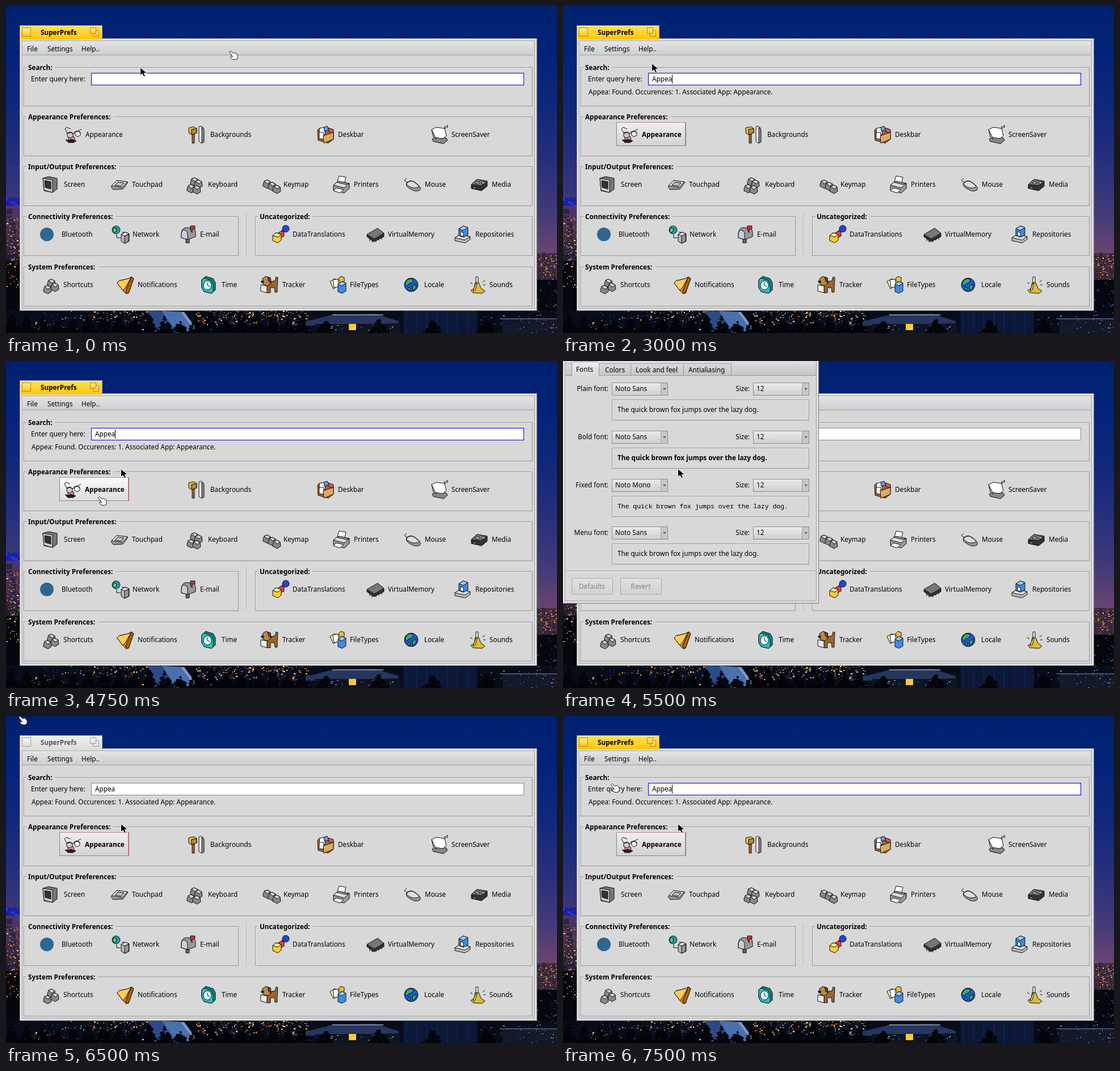
Write an HTML page with a canvas that moves like this. It is 971 px wide and 577 px high and loops after 8 s.

```html
<!DOCTYPE html>
<html lang="en">
<head>
<meta charset="utf-8">
<title>SuperPrefs</title>
<style>
html, body { margin: 0; width: 100%; height: 100%; overflow: hidden; background: #00206f; }
canvas { display: block; }
</style>
</head>
<body>
<canvas id="stage" width="971" height="577"></canvas>
<script>
const g = document.getElementById('stage').getContext('2d');
const PANEL = '#d8d8d8', LINE = '#989898', STEP = 250, LOOP = 8000;
const SANS = '11.72px "Noto Sans", sans-serif', MONO = '11.4px "Noto Sans Mono", monospace';

// A keycap: dark body with a lighter top face.
const key = (x, y) => `#888 M${x} ${y}l2-6 5-2 6 3 1 8-6 4-8-4z|#d4d4d4 M${x + 2} ${y - 6}l5-2 6 3-5 4z`;

// Layers are "fill path", drawn around the icon's centre.
const icons = {
  Appearance: '#e88 M-8 4l5-2 5 2 1 5-6 3-5-3z|#222 M-13 9l6 1 4-2 6 2 3 1-5 3-9 0z|#ccc M-10 -3l6-2 4 3 0 5-5 3-5-3z|#eee M3 -5l6-2 4 3 0 5-5 3-4-3z|none M-10 -3l-4-7 3-3 7 3M10 -7l5-3M0 -2l4-1M-10 -2l6-2 4 3M3 -4l6-2 4 3',
  Backgrounds: '#963 M-9 -1h4v16h-4z|#db5 M-15 -12l9-2 5 3v8l-9 3-5-3z|#b83 M-10 -9l9-2v8l-9 3z|#eee M3 -14l4-1 4 3v25l-4 2-4-3z|#888 M8 -13l4 4v22l-4 2z',
  Deskbar: '#a63 M-14 -8l4-4 24 6v14l-9 7-18-5z|#fff M-11 -11l9-2 2 12-10 3z|#69e M-3 -13l6-2 3 7-8 2z|#d55 M5 -12l9 3v6l-8-2z|#fff M-11 -4h8v12l-8-1z|#da6 M-4 2l18-6v12l-17 7z',
  ScreenSaver: '#888 M-13 8l5-4 20 2 2 4-7 6-18-4z|#bbb M-14 -9l6 3 2 14-5-4z|#fff M-14 -9l8-4 15 2 3 13-6 5-13-2z|none M8 -14h3l-3 3h3M12 -16h3l-3 3h3',
  Screen: '#777 M-13 -11l10-3 15 3v19l-8 6-15-3z|#ccc M-13 -11l17 3v22l-15-4z|#333 M-10 -7l11 2v13l-10-3z',
  Touchpad: '#999 M-15 4l10-11 20 3-9 12-17 1z|#ddd M-14 2l9-9 19 2-9 10z|#bbc M-8 1l5-5 11 1-5 6z',
  Keyboard: [key(-8, -4), key(-1, 0), key(-14, 8), key(-4, 10)].join('|'),
  Keymap: [key(-15, 0), key(-6, 4), key(2, 9)].join('|'),
  Printers: '#fff M-4 -15l12 2-3 13-13-2z|#999 M-14 1l9-7 19 4v9l-9 8-19-5z|#ddd M-14 1l6-5 16 4 6-2-9 8z|#fff M-14 11l5-5 13 3-6 6z',
  Mouse: '#999 M-10 -3q7-7 16 0 12 9 7 13-7 4-16-2-10-5-7-11z|#ddd M-9 -3q7-6 14 0 9 6 6 8-10 3-17-2-6-4-3-6z|none M-9 -4l-5-3 4-4',
  Media: '#333 M-14 0l10-9 18 3v9l-10 8-18-4z|#777 M-14 0l10-9 18 3-10 8z|#ccc M-7 -2l3-3 5 1-3 3zM3 -2l3-3 5 1-3 3z|#999 M-11 4l5 1v3l-5-1z',
  Network: '#29a M-15 -8a7 7 0 1 1 14 0 7 7 0 1 1-14 0z|#6c7 M-12 -12l5 2-1 5-4 2-2-4z|none M-7 0v6h7M2 -4l9 1|#bbb M1 0l7-4 7 3v13l-8 4-6-4z|#ddd M1 0l7-4 7 3-8 4z|#999 M7 3l7-3v12l-7 4z',
  'E-mail': '#666 M-4 7h6v8h-6z|#999 M-12 -2q1-9 8-10l13 1q4 2 4 8v7l-13 5-12-3z|#ccd M-12 -2q2-8 7-5 5 3 4 9v7l-11-3z|#c33 M4 -8v-7h8v5l-5 1v6z',
  DataTranslations: '#c33 M-2 -3l6-6 4 3-6 6z|#24d M3 -10a6 6 0 1 1 12 0 6 6 0 1 1-12 0z|#e44 M-4 -3l6-3 4 3v6l-6 3-4-3z|#fc3 M-14 2l6-5 9 3v10l-6 5-9-4z|#fe9 M-14 2l6-5 9 3-6 5z',
  VirtualMemory: '#333 M-15 1l19-10 11 7v6l-18 9-12-9z|#777 M-15 0l19-11 11 9-17 10z|none M-10 6v6M-6 9v5M1 9v5M6 6v5M11 4v5',
  Repositories: '#bbb M-14 6l9-6 18 4v5l-9 6-18-4z|#ddd M-14 6l9-6 18 4-9 6z|#48d M-7 -10l8-5 8 3v13l-8 4-8-3z|#9cf M-7 -10l8-5 8 3-8 5z|#fff M-4 -5l5 2v7l-5-2z',
  Shortcuts: [key(-7, -2), key(-1, 5), key(-14, 9)].join('|'),
  Notifications: '#d82 M-15 -3q2-5 7-5l13-3 5-3 4 3-5 14-4 11-4 2-6-6z|#fc5 M-15 -3q2-5 7-5l13-3 5-3-10 18-5 6z|#a60 M10 -14l4 3-9 26-4-1-1-3z',
  Time: '#087 M-12 -9l7-6 13 4 4 7v13l-7 6-13-3-4-7z|#3bb M-12 -9l4-3 12 4 4 8v13l-3 2-13-3-4-7z|#dff M-9 0a7 8 0 1 1 14 2 7 8 0 1 1-14-2z|none M-2 -4v5l4 2',
  Tracker: '#963 M-4 -5l14-2 2-7 3 1-1 18 0 8h-4l-1-8-7 0 0 9h-6z|#b84 M-12 -11l6-4 8 3 1 9-6 5-8-3z|#742 M-3 -14l5 2 1 9-4-3z|#222 M-14 -7h4v3h-4z|#eee M-15 0l11 2v12l-11-3z',
  FileTypes: '#fe9 M-15 -6l9-5 6 12-9 6z|#fff M-10 -9l9-1 2 13-9 2z|#eb4 M0 -11l4-4 6 2v7l-7 2z|#48d M-1 -1l7-5 7 3v14l-7 4-7-3z|#9cf M-1 -1l7-5 7 3-7 5z',
  Locale: '#25c M-12 0a12 12 0 1 1 24 0 12 12 0 1 1-24 0z|#3a7 M-7 -9l6-2 5 2-2 5-6 2-3 4-4-4zM2 2l7-3-1 7-5 4zM-5 4l4 2-1 4-4-2z',
  Sounds: '#eee M-3 -14h4v11h-4z|#db3 M-4 -4h6l4 10 7 5-5 4-16-1-4-4 6-4z|#fe8 M-3 -3h2l-3 12-4 2z|none M9 -5l4-3M10 0h4M-9 -2l-4-2'
};

const groups = [
  ['Search:', 31, 108, 897, 69, []],
  ['Appearance Preferences:', 31, 195, 897, 70,
    [['Appearance', 118, 140], ['Backgrounds', 337, 360], ['Deskbar', 563, 585], ['ScreenSaver', 764, 785]]],
  ['Input/Output Preferences:', 31, 283, 897, 70,
    [['Screen', 78, 102], ['Touchpad', 200, 222], ['Keyboard', 333, 356], ['Keymap', 468, 489],
     ['Printers', 591, 613], ['Mouse', 716, 738], ['Media', 834, 856]]],
  ['Connectivity Preferences:', 31, 371, 379, 70,
    [['Bluetooth', 72, 98], ['Network', 202, 223], ['E-mail', 321, 342]]],
  ['Uncategorized:', 439, 371, 489, 70,
    [['DataTranslations', 484, 505], ['VirtualMemory', 651, 673], ['Repositories', 805, 827]]],
  ['System Preferences:', 31, 460, 897, 70,
    [['Shortcuts', 80, 101], ['Notifications', 211, 232], ['Time', 357, 380], ['Tracker', 464, 487],
     ['FileTypes', 586, 606], ['Locale', 714, 737], ['Sounds', 831, 852]]]
];

// [time, x, y]: sampled on a quarter-second grid, moving linearly between.
const arrowPath = [[0, 236, 108], [1000, 214, 138], [2250, 214, 138], [3000, 156, 101], [3500, 202, 192], [3750, 202, 190]];
const handPath = [[0, 393, 79], [3750, 392, 82], [4750, 162, 239], [5250, 162, 239],
  [6250, 22, 0], [6750, 22, 0], [7500, 84, 119]];

function at(path, t) {
  const i = path.findIndex(k => k[0] > t);
  if (i < 0) return path[path.length - 1].slice(1);
  const [a, b] = [path[i - 1], path[i]], u = (t - a[0]) / (b[0] - a[0]);
  return [1, 2].map(n => Math.round(a[n] + (b[n] - a[n]) * u));
}

function rect(x, y, w, h, fill) { g.fillStyle = fill; g.fillRect(x, y, w, h); }
function frame(x, y, w, h, color) {
  g.strokeStyle = color; g.lineWidth = 1; g.strokeRect(x + .5, y + .5, w - 1, h - 1);
}
function shade(y, h, ...colors) {
  const s = g.createLinearGradient(0, y, 0, y + h);
  colors.forEach((c, i) => s.addColorStop(i / (colors.length - 1), c));
  return s;
}
function poly(fill, ...pts) {
  g.fillStyle = fill; g.beginPath();
  for (let i = 0; i < pts.length; i += 2) g.lineTo(pts[i], pts[i + 1]);
  g.fill();
}
function text(s, x, y, { bold = false, color = '#000', align = 'left', font = SANS } = {}) {
  g.font = (bold ? 'bold ' : '') + font;
  g.textAlign = align; g.fillStyle = color; g.fillText(s, x, y);
  return g.measureText(s).width;
}
function etched(x, y, w, h) {
  frame(x + 1, y + 1, w - 1, h - 1, '#e8e8e8');
  frame(x, y, w, h, LINE);
}
function shape(x, y, path, fill, line) {
  const p = new Path2D(path);
  g.save(); g.translate(x, y);
  if (fill !== 'none') { g.fillStyle = fill; g.fill(p); }
  g.strokeStyle = line; g.lineWidth = 1; g.stroke(p);
  g.restore();
}
function icon(name, x, y) {
  if (name === 'Bluetooth') {
    g.fillStyle = '#2f6690'; g.beginPath(); g.arc(x, y, 12, 0, 7); g.fill();
    return;
  }
  for (const layer of icons[name].split('|')) {
    const cut = layer.indexOf(' ');
    shape(x, y, layer.slice(cut + 1), layer.slice(0, cut), '#111');
  }
}

function city() {
  let seed = 17;
  const rnd = () => (seed = seed * 16807 % 2147483647) / 2147483647;
  const lights = (n, x, y, w, h, colors) => {
    for (let i = 0; i < n; i++)
      rect(x + rnd() * w | 0, y + rnd() * h | 0, 1 + rnd() * 3 | 0, 1 + rnd() * 2 | 0, colors[rnd() * colors.length | 0]);
  };
  const tree = (x, top, spread) => {
    for (let i = 0; i < 70; i++) {
      const d = Math.sqrt(rnd());
      rect(x + (rnd() - .5) * 2 * spread * d | 0, top + d * (577 - top) | 0, 2 + rnd() * 5, 2 + rnd() * 3, '#020409');
    }
  };
  const warm = ['#ffb45a', '#ffe4a0', '#b8642f', '#6a4038', '#302028'];
  const cool = ['#28427c', '#3a5c9c', '#16264c', '#7a90bc', '#0a1428'];

  rect(0, 0, 971, 577, shade(0, 460, '#00206f', '#03237a', '#10287a', '#272f7c', '#443a78', '#78486c'));
  rect(0, 338, 24, 14, '#1c22a0');
  lights(26, 0, 338, 24, 14, ['#2c3cff', '#0a1490', '#4c5cff']);
  rect(0, 353, 24, 97, shade(353, 97, '#4c366c', '#4a3048', '#1c1828'));
  for (let y = 358; y < 450; y += 12) rect(rnd() * 14 | 0, y, 10, 9, '#2b2442');
  lights(100, 0, 370, 24, 85, warm);
  rect(0, 450, 24, 127, '#05070f');
  lights(26, 0, 452, 24, 45, warm);
  rect(935, 436, 36, 50, '#4a2d3c');
  for (let x = 935; x < 971; x += 9) rect(x, 420 + rnd() * 25, 7, 60, '#33263c');
  lights(85, 935, 438, 36, 45, warm);
  rect(935, 483, 36, 94, '#05070e');
  lights(20, 935, 488, 36, 50, cool);

  rect(0, 538, 971, 39, '#070c1a');
  lights(120, 30, 538, 230, 34, warm.concat(cool));
  lights(70, 120, 538, 130, 20, warm);
  lights(260, 335, 538, 200, 24, warm);
  lights(80, 340, 560, 200, 17, cool);
  poly('#2c4a86', 250, 538, 312, 540, 342, 577, 262, 577);
  poly('#4a70ae', 275, 538, 312, 540, 338, 577, 300, 577);
  poly('#8098c4', 308, 540, 314, 540, 341, 577, 336, 577);
  poly('#26365e', 500, 564, 575, 545, 650, 543, 692, 556, 692, 560, 545, 564);
  rect(545, 561, 150, 16, '#0d1424');
  rect(575, 544, 90, 2, '#7482a0');
  rect(604, 561, 13, 11, '#ffc928');
  lights(24, 560, 563, 130, 10, warm);
  rect(700, 538, 132, 39, '#0b1838');
  for (let x = 705; x < 830; x += 18) rect(x, 540, 1, 37, '#152a56');
  rect(830, 538, 45, 39, '#060b16');
  rect(875, 552, 96, 25, '#13182a');
  rect(870, 551, 101, 2, '#48526c');
  lights(45, 830, 538, 141, 39, cool);
  lights(20, 920, 538, 51, 39, warm);
  for (let i = 0; i < 20; i++) tree(8 + i * 27, 538 + rnd() * 16, 15);
  for (let i = 0; i < 4; i++) tree(560 + i * 95, 552, 18);
}

function windowFrame(x, y, w, h) {
  rect(x, y, w, h, PANEL);
  const leftTop = ['#989898', '#f0f0f0', '#e0e0e0', '#d4d4d4', '#b4b4b4'];
  const rightBottom = ['#888', '#d0d0d0', '#e0e0e0', '#f0f0f0', '#989898'];
  for (let i = 0; i < 5; i++) {
    const l = x + i, t = y + i, iw = w - 2 * i, ih = h - 2 * i;
    rect(l, t, iw, 1, leftTop[i]);
    rect(l, t, 1, ih, leftTop[i]);
    rect(l, t + ih - 1, iw, 1, rightBottom[i]);
    rect(l + iw - 1, t, 1, ih, rightBottom[i]);
  }
}

function titleTab(active) {
  const [hi, lo, edge] = active ? ['#ffe25c', '#ffc50a', '#b08a20'] : ['#f2f2f2', '#dcdcdc', '#999'];
  rect(24, 34, 146, 25, shade(34, 25, hi, lo));
  rect(25, 35, 144, 1, active ? '#fff0a0' : '#fff');
  rect(25, 35, 1, 24, active ? '#fff0a0' : '#fff');
  g.strokeStyle = LINE; g.beginPath(); g.moveTo(24.5, 58); g.lineTo(24.5, 34.5); g.lineTo(169.5, 34.5); g.lineTo(169.5, 58); g.stroke();
  for (const [x, y, s] of [[28, 38, 16], [153, 43, 11], [148, 38, 11]]) {
    rect(x, y, s, s, shade(y, s, active ? '#fff0a0' : '#f8f8f8', lo));
    frame(x, y, s, s, edge);
  }
  text('SuperPrefs', 61, 51, { bold: true, color: active ? '#000' : '#555' });
}

function prefsWindow(t, query, active) {
  windowFrame(24, 57, 912, 481);
  titleTab(active);
  rect(29, 62, 901, 24, shade(62, 24, '#e4e4e4', '#cfcfcf'));
  rect(29, 86, 901, 1, '#a0a0a0');
  [['File', 37], ['Settings', 73], ['Help..', 133]].forEach(([s, x]) => text(s, x, 80));

  const found = query.length > 1;
  for (const [title, x, y, w, h, items] of groups) {
    etched(x, y, w, h);
    g.font = 'bold ' + SANS;
    rect(x + 5, y - 1, g.measureText(title).width + 8, 4, PANEL);
    text(title, x + 8, y + 5, { bold: true });
    for (const [name, ix, tx] of items) {
      const hit = found && name === 'Appearance';
      if (hit) {
        const hover = t >= 4750 && t < 5000;
        rect(94, 205, 123, 42, shade(205, 42, hover ? '#fafafa' : '#efefef', hover ? '#dedede' : '#d2d2d2'));
        frame(94, 205, 123, 42, '#888');
        rect(94, 205, 122, 1, '#c48a8a');
        rect(215, 206, 1, 41, '#cc7070');
      }
      icon(name, ix - hit, y + 32);
      text(name, tx - hit, y + 36, { bold: hit });
    }
  }
  g.setLineDash([1, 1]);
  g.strokeStyle = '#a4a4a4'; g.beginPath(); g.moveTo(423.5, 365); g.lineTo(423.5, 440); g.stroke();
  g.setLineDash([]);

  text('Enter query here:', 44, 133);
  rect(150, 118, 763, 22, '#fff');
  frame(150, 118, 763, 22, active ? '#0000d4' : '#888');
  const width = text(query, 157, 133);
  const caret = query ? active : t >= 500 && t < 1000;
  if (caret) rect(Math.round(157 + width), 121, 1, 16, '#000');
  if (query) text(found ? `${query}: Found. Occurences: 1. Associated App: Appearance.` : query, 45, 156);
}

function popup(label, x, y) {
  rect(x, y, 99, 23, shade(y, 23, '#ececec', '#cecece'));
  frame(x, y, 99, 23, '#8e8e8e');
  rect(x + 87, y + 1, 11, 21, '#c6c6c6');
  rect(x + 86, y + 1, 1, 21, '#a6a6a6');
  poly('#555', x + 90, y + 10, x + 96, y + 10, x + 93, y + 13);
  text(label, x + 6, y + 15);
}

function fontsWindow() {
  windowFrame(-1, -30, 452, 458);
  rect(4, 0, 442, 25, shade(0, 25, '#dedede', '#c6c6c6'));
  rect(4, 25, 442, 1, LINE);
  rect(4, 4, 292, 1, '#a6a6a6');
  [119, 212, 296].forEach(x => rect(x, 5, 1, 20, LINE));
  rect(16, 1, 48, 25, shade(1, 25, '#eee', PANEL));
  g.strokeStyle = LINE; g.beginPath(); g.moveTo(15.5, 25.5); g.lineTo(15.5, 4.5); g.lineTo(18.5, 1.5);
  g.lineTo(60.5, 1.5); g.lineTo(63.5, 4.5); g.lineTo(63.5, 25.5); g.stroke();
  [['Fonts', 23], ['Colors', 74], ['Look and feel', 128], ['Antialiasing', 221]].forEach(([s, x], i) => text(s, x, i ? 20 : 19));

  [['Plain', 0], ['Bold', 85], ['Fixed', 170], ['Menu', 254]].forEach(([kind, y]) => {
    const mono = kind === 'Fixed';
    text(kind + ' font:', 80, y + 53, { align: 'right' });
    popup(mono ? 'Noto Mono' : 'Noto Sans', 86, y + 38);
    text('Size:', 329, y + 53, { align: 'right' });
    popup('12', 335, y + 38);
    etched(86, y + 68, 348, 37);
    text('The quick brown fox jumps over the lazy dog.', 96, y + 90, { bold: kind === 'Bold', font: mono ? MONO : SANS });
  });

  rect(4, 370, 442, 1, LINE);
  rect(4, 371, 442, 1, '#eee');
  [['Defaults', 15], ['Revert', 101]].forEach(([s, x]) => {
    rect(x, 383, 73, 29, shade(383, 29, '#e0e0e0', '#d2d2d2'));
    frame(x, 383, 73, 29, '#aaa');
    text(s, x + 36, 402, { align: 'center', color: '#858585' });
  });
}

function queryAt(t) {
  const length = t < 1750 ? 0 : t < 2000 ? 1 : t < 2500 ? 3 : t < 2750 ? 4 : 5;
  return 'Appea'.slice(0, length);
}

function draw(t) {
  g.drawImage(backdrop, 0, 0);
  prefsWindow(t, queryAt(t), t < 5000 || t >= 6750);
  if (t >= 5250 && t < 6500) fontsWindow();
  const [ax, ay] = at(arrowPath, t);
  shape(ax, ay, 'M.5 .5v14l3.5-3 3 5 2.5-1-2.5-5 5-.5z', '#000', '#eee');
  const handShown = t < 1750 || (t >= 3750 && t < 5500) || t >= 6250;
  if (handShown) {
    const [hx, hy] = at(handPath, t);
    shape(hx, hy, 'M.5 2.5l2-2 5 4 3-1 3 2 2 4-1 5-3 1h-5l-4-4 1-2 3 1z', '#fff', '#111');
  }
}

city();
const backdrop = document.createElement('canvas');
backdrop.width = 971; backdrop.height = 577;
backdrop.getContext('2d').drawImage(g.canvas, 0, 0);

const start = performance.now();
function tick() {
  const t = (performance.now() - start) % LOOP;
  draw(Math.floor(t / STEP) * STEP);
  requestAnimationFrame(tick);
}
tick();
</script>
</body>
</html>
```
